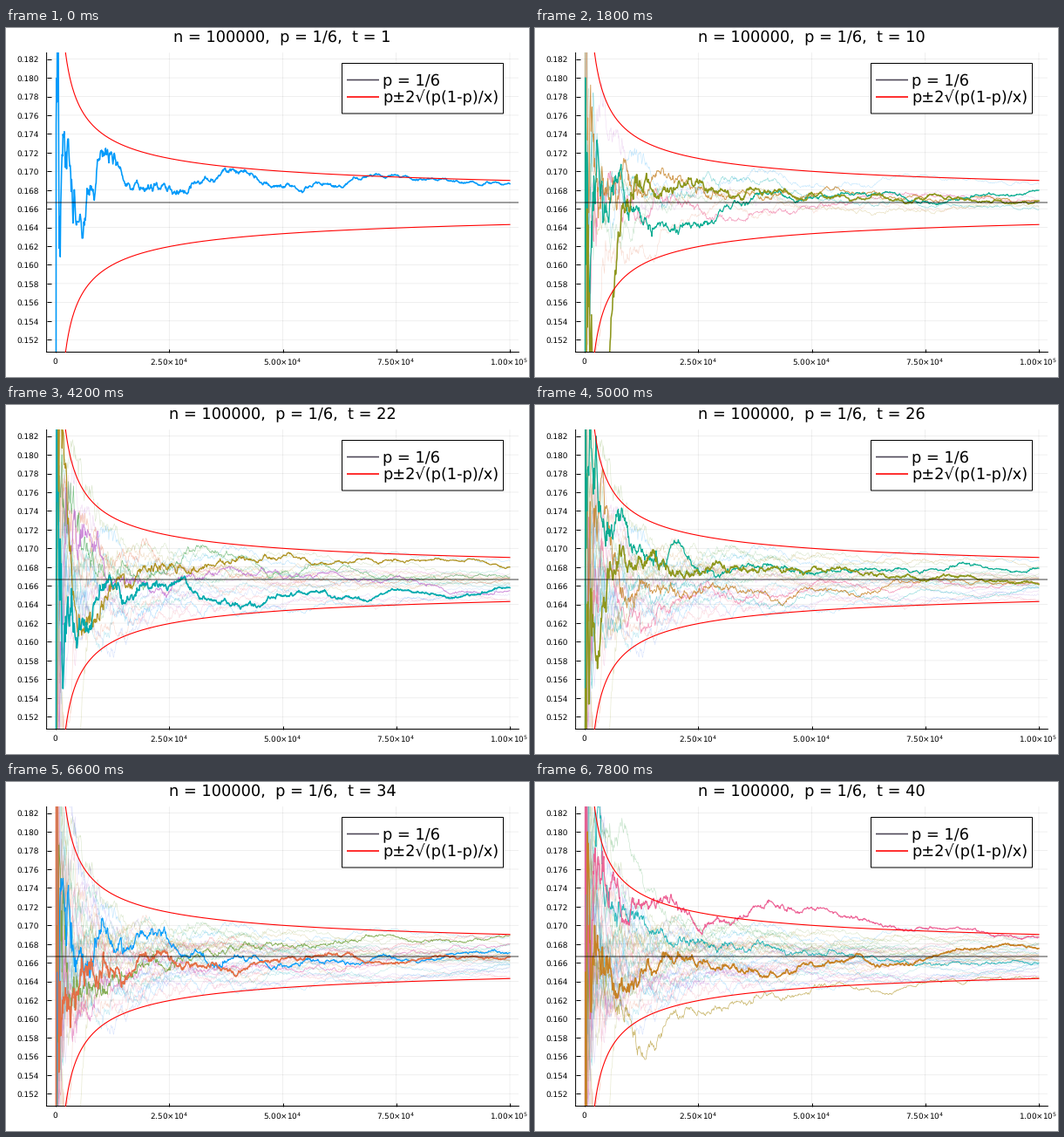
Animation of 600x400 px, one loop 8 s. Source, as a matplotlib script:

```python
import numpy as np
import matplotlib.pyplot as plt
from matplotlib.animation import FuncAnimation
from matplotlib.patches import Rectangle

W, H, DPI = 600, 400, 100
PX = 72 / DPI                      # one pixel in points
RUNS, N, STEP = 40, 100_000, 100
P = 1 / 6
SPAN = 0.016                       # half height of the value axis
LEFT, RIGHT, TOP, BOTTOM = 46.6, 588.4, 28.5, 371.5
BIG, SMALL = 17.75 * PX, 8.87 * PX

PALETTE = ("#009afa #e36f47 #3ea44e #c371d2 #ac8e18 #00aaae #ed5e93 #c68225 "
           "#00a98d #8e971e #00a9cc #9b7fe9 #618df6 #f05f73 #dd65b6 #6c9f33").split()

# Key points of the first run: thousands of throws, deviation from P in 1e-4
FIRST = [(.2, 133), (1, -58), (2.7, 68), (6, -38), (11, 58), (17.5, 21),
         (26.4, 10), (39, 36), (48, 18), (72, 28), (100, 20)]

plt.rcParams["path.snap"] = False
plt.rcParams["text.hinting"] = "none"

throws = np.arange(0, N + 1, STEP)
throws[0] = 1


def running_mean(run):
    """Share of sixes so far; the first run is bridged through its key points."""
    rng = np.random.default_rng(700 + run)
    hits = rng.binomial(STEP, P, len(throws) - 1) - STEP * P
    walk = np.concatenate([[0], np.cumsum(hits)])
    if run == 1:
        at, dev = np.array([(0, 0), *FIRST]).T * [[1000], [1e-4]]
        walk += np.interp(throws, at, at * dev - np.interp(at, throws, walk))
    mean = P + walk / throws
    mean[0] = run % 6 == 0
    return mean


fig = plt.figure(figsize=(W / DPI, H / DPI), dpi=DPI, facecolor="white")
ax = fig.add_axes([LEFT / W, 1 - BOTTOM / H, (RIGHT - LEFT) / W, (BOTTOM - TOP) / H])
ax.set_xlim(-0.02 * N, 1.02 * N)
ax.set_ylim(P - SPAN, P + SPAN)
ax.spines[["top", "right"]].set_visible(False)
for side in ("left", "bottom"):
    ax.spines[side].set_linewidth(PX)
ax.set_xticks(np.linspace(0, N, 5))
ax.set_yticks(np.arange(152, 183, 2) / 1000)
ax.tick_params(direction="in", length=4.5 * PX, width=PX,
               labelbottom=False, labelleft=False)
ax.grid(color="black", alpha=0.1, linewidth=0.6 * PX)
ax.set_axisbelow(True)

# Pixel-space layer for the text and the legend
over = fig.add_axes([0, 0, 1, 1])
over.set_xlim(0, W)
over.set_ylim(H, 0)
over.axis("off")


def label(x, y, text, size, ha="center", va="baseline"):
    return over.text(x, y, text, fontsize=size, family="DejaVu Sans", ha=ha, va=va)


title = label(317, 16, "", BIG)
for tick in ax.get_yticks():
    y = TOP + (P + SPAN - tick) / (2 * SPAN) * (BOTTOM - TOP)
    label(38, y + 0.3, f"{tick:.3f}", SMALL, "right", "center_baseline")

label(56.7, 385, "0", SMALL)
for i in range(1, 5):
    mantissa, power = f"{i * N / 4:.2e}".split("e+0")
    label(56.7 + i * 130.2, 387, f"{mantissa}×10$^{{{power}}}$", SMALL)

over.add_patch(Rectangle((385.5, 40.5), 185, 57.5, facecolor="white",
                         edgecolor="black", linewidth=PX))
for y, color, text in [(59.5, "#4d4757", "p = 1/6"),
                       (79, "red", "p±2√(p(1-p)/x)")]:
    over.plot([391, 428], [y, y], color=color, linewidth=1.6 * PX,
              solid_capstyle="butt")
    label(432, y + 6.7, text, BIG, "left")

lines = [ax.plot(throws, running_mean(run), color=PALETTE[(run - 1) % 16],
                 solid_joinstyle="round", zorder=2 + run / 100)[0]
         for run in range(1, RUNS + 1)]
ax.axhline(P, color="black", alpha=0.75, linewidth=PX, zorder=4)
x = np.linspace(500, N, 1000)
for sign in (1, -1):
    ax.plot(x, P + sign * 2 * np.sqrt(P * (1 - P) / x), color="red",
            linewidth=1.1 * PX, zorder=5)


def draw(frame):
    title.set_text(f"n = {N},  p = 1/6,  t = {frame + 1}")
    for i, line in enumerate(lines):
        age = frame - i
        line.set_visible(age >= 0)
        if age >= 0:
            # older runs get thinner and paler
            line.set_alpha(np.clip(1.1 - 0.15 * age, 0.28, 1))
            line.set_linewidth(max(0.5, 1.6 * 0.76 ** age) * PX)
    return [title, *lines]


anim = FuncAnimation(fig, draw, frames=RUNS, interval=200, repeat=True,
                     repeat_delay=0, blit=False)
plt.show()
```
